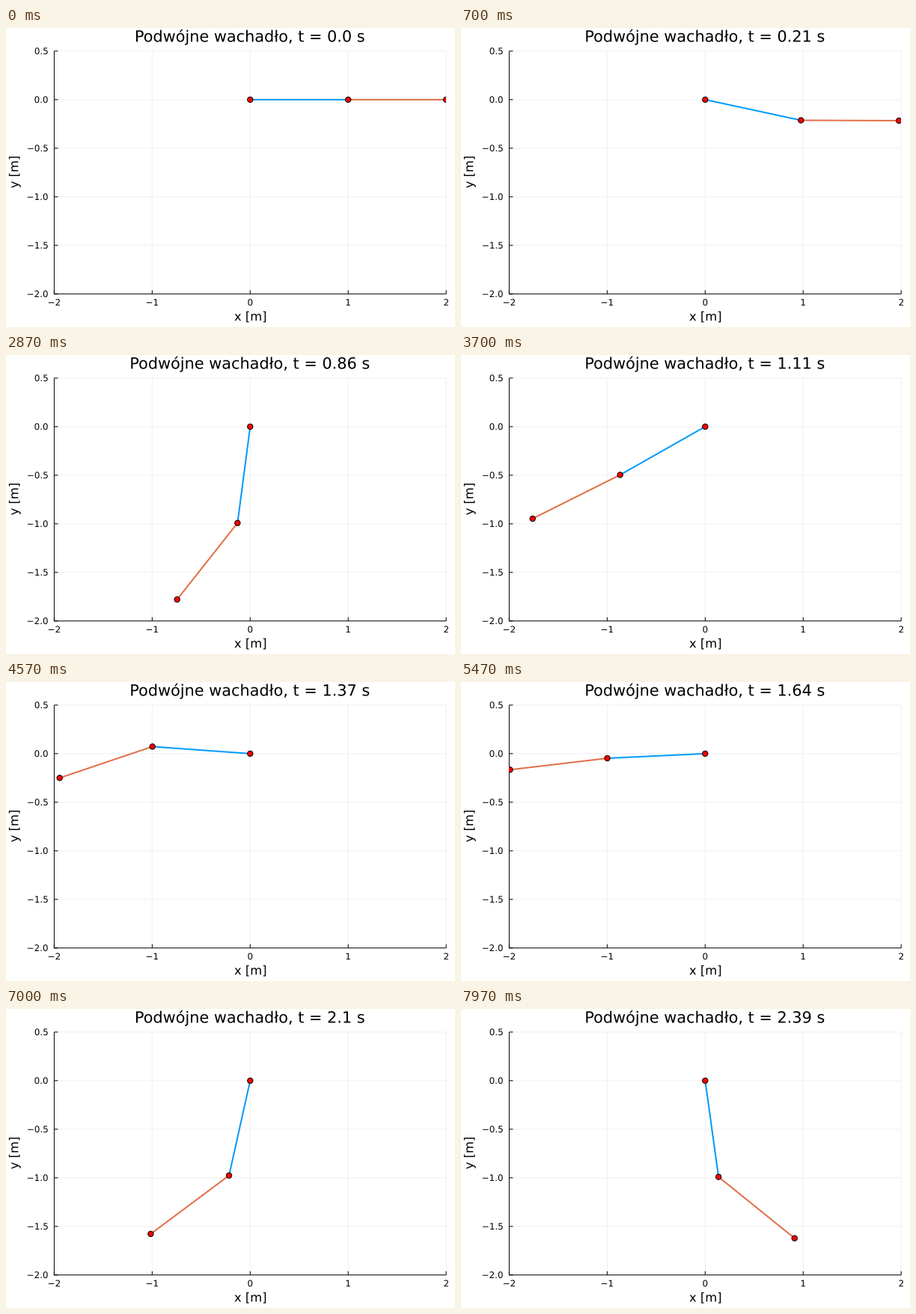
A matplotlib script for the animation above (8 s loop, 600 by 400 pixels).

```python
import numpy as np
import matplotlib.pyplot as plt
from matplotlib.animation import FuncAnimation
from matplotlib.patches import Circle, PathPatch, Rectangle
from matplotlib.textpath import TextPath
from matplotlib.transforms import Affine2D

W, H, DPI = 600, 400, 100
PX = 72 / DPI                      # points per pixel
FRAMES, LOOP_MS = 240, 8000
DT, SUB = 0.01, 10                 # time per frame, solver steps per frame
G, M1, M2, L1, L2 = 9.81, 1.0, 1.0, 1.0, 1.0
LEFT, RIGHT, TOP, BOTTOM = 64.4, 588.19, 30.87, 355.8
MID_X = (LEFT + RIGHT) / 2
TITLE, GUIDE, TICK = 20.83, 16.37, 11.9   # text sizes in pixels
GRID = "#f0f0f0"


def to_px(x, y):
    """Metres to stage pixels."""
    return (LEFT + (x + 2) / 4 * (RIGHT - LEFT),
            TOP + (0.5 - y) / 2.5 * (BOTTOM - TOP))


def rates(state):
    """Double pendulum, angles measured from straight down."""
    a, b, wa, wb = state
    s, c = np.sin(a - b), np.cos(a - b)
    mu = M2 / (M1 + M2)
    acc_a = (-G * np.sin(a) + mu * c * G * np.sin(b)
             - mu * s * (c * L1 * wa**2 + L2 * wb**2)) / (L1 * (1 - mu * c * c))
    acc_b = (-G * np.sin(b) - c * L1 * acc_a + s * L1 * wa**2) / L2
    return np.array([wa, wb, acc_a, acc_b])


def rk4(state, h):
    k1 = rates(state)
    k2 = rates(state + h / 2 * k1)
    k3 = rates(state + h / 2 * k2)
    k4 = rates(state + h * k3)
    return state + h / 6 * (k1 + 2 * k2 + 2 * k3 + k4)


def simulate():
    state = np.array([np.pi / 2, np.pi / 2, 0.0, 0.0])
    path = []
    for _ in range(FRAMES):
        path.append(state[:2])
        for _ in range(SUB):
            state = rk4(state, DT / SUB)
    return path


angles = simulate()

fig = plt.figure(figsize=(W / DPI, H / DPI), dpi=DPI, facecolor="white")
ax = fig.add_axes([0, 0, 1, 1])
ax.set_xlim(0, W)
ax.set_ylim(H, 0)
ax.axis("off")


def segment(x0, y0, x1, y1, color="black", z=5):
    ax.plot([x0, x1], [y0, y1], color=color, lw=PX, zorder=z,
            solid_capstyle="butt", snap=False)


def outline(x, y, text, size, align=0.5, angle=0):
    """Glyph outlines with baseline y; align 0.5 centres, 1 right-aligns."""
    path = TextPath((0, 0), text, size=size, prop="DejaVu Sans")
    box = path.get_extents()
    shift = box.x0 + align * box.width
    place = Affine2D().translate(-shift, 0).scale(1, -1)
    return place.rotate_deg(angle).translate(x, y).transform_path(path)


def label(*args, **kw):
    patch = PathPatch(outline(*args, **kw), fc="black", lw=0, snap=False)
    return ax.add_patch(patch)


def minus(text):
    return text.replace("-", "\u2212")


# grid, ticks and tick labels
for v in range(-2, 3):
    x, _ = to_px(v, 0)
    segment(x, TOP, x, BOTTOM, GRID, 1)
    segment(x, BOTTOM, x, BOTTOM - 5)
    label(x, 371.3, minus(str(v)), TICK)
for v in np.arange(-2, 0.6, 0.5):
    _, y = to_px(0, v)
    segment(LEFT, y, RIGHT, y, GRID, 1)
    segment(LEFT, y, LEFT + 5, y)
    label(55.7, y + 4.2, minus(f"{v:.1f}"), TICK, align=1)

segment(LEFT, TOP, LEFT, BOTTOM + 0.5)
segment(LEFT, BOTTOM, RIGHT, BOTTOM)
label(MID_X, 391.5, "x [m]", GUIDE)
label(16.3, 193, "y [m]", GUIDE, angle=-90)
title = label(MID_X, 18.4, "t", TITLE)

# pendulum, clipped to the plot area
clip = Rectangle((LEFT, TOP), RIGHT - LEFT, BOTTOM - TOP,
                 transform=ax.transData)
rods = [ax.plot([], [], color=color, lw=2 * PX, zorder=6, snap=False)[0]
        for color in ("#009afa", "#e26f46")]
bobs = [ax.add_patch(Circle((0, 0), 3.65, fc="red", ec="black", lw=PX,
                            zorder=8, snap=False)) for _ in range(3)]
for part in rods + bobs:
    part.set_clip_path(clip)


def draw(i):
    a, b = angles[i]
    x1, y1 = L1 * np.sin(a), -L1 * np.cos(a)
    x2, y2 = x1 + L2 * np.sin(b), y1 - L2 * np.cos(b)
    xs, ys = to_px(np.array([0, x1, x2]), np.array([0, y1, y2]))
    for k, rod in enumerate(rods):
        rod.set_data(xs[k:k + 2], ys[k:k + 2])
    for bob, x, y in zip(bobs, xs, ys):
        bob.center = x, y
    text = f"Podwójne wachadło, t = {round(i * DT, 2)} s"
    title.set_path(outline(MID_X, 18.4, text, TITLE))
    return [*rods, *bobs, title]


anim = FuncAnimation(fig, draw, frames=FRAMES, interval=LOOP_MS / FRAMES,
                     init_func=lambda: draw(0), repeat=True, repeat_delay=0)
plt.show()
```
